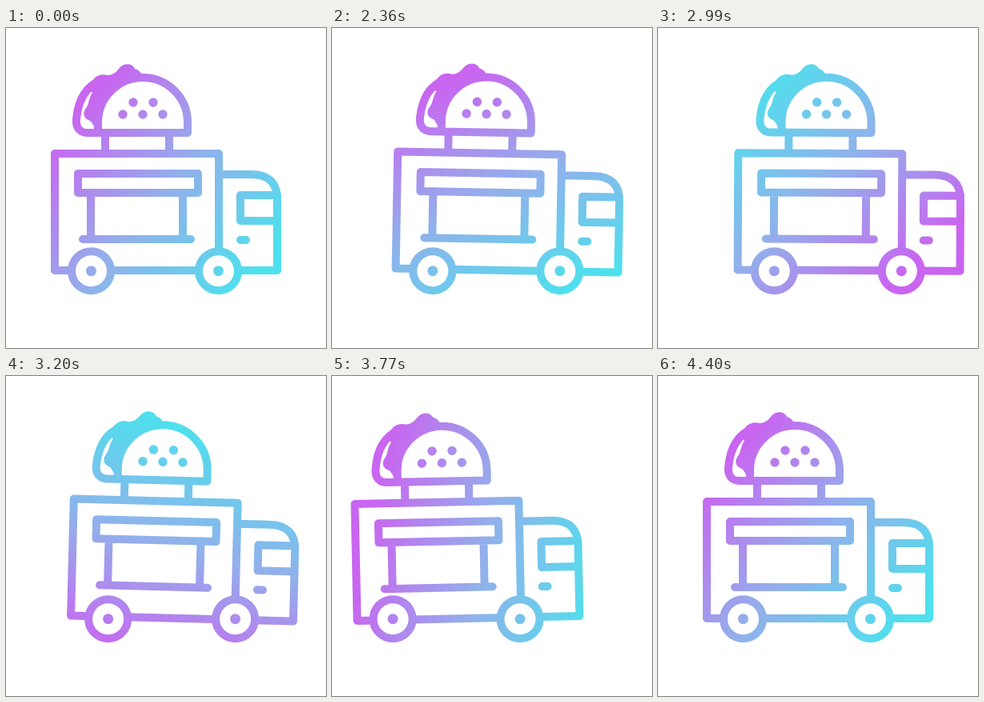
An HTML page for the animation above (4460 ms loop, 400x400 px).

```html
<!DOCTYPE html>
<html lang="en">
<head>
<meta charset="utf-8">
<title>Taco truck</title>
<style>
  html, body { margin: 0; width: 100%; height: 100%; overflow: hidden; background: #fff; }
  svg { display: block; width: 100%; height: 100%; }
</style>
</head>
<body>
<svg viewBox="0 0 400 400">
  <defs>
    <linearGradient id="paint" gradientUnits="userSpaceOnUse" x1="45" y1="210" x2="345" y2="210">
      <stop stop-color="#c965f0"/>
      <stop offset=".5" stop-color="#92b0eb"/>
      <stop offset="1" stop-color="#4ee0ed"/>
    </linearGradient>
  </defs>
  <g id="truck" fill="none" stroke="url(#paint)" stroke-width="10" stroke-linecap="round" stroke-linejoin="round">
    <g id="body">
      <path d="M61 303V157H266V303M61 303H339V214Q339 183 306 183H266"/>
      <path d="M339 209H293V241H339M293 265H300"/>
      <path d="M90 182H240V206H90ZM106 206V264M221 206V264M96 264H231"/>
      <path d="M124 131V157M204 131V157" stroke-linecap="butt"/>
      <path d="M115 131V118A56 56 0 0 1 227 118V131H102C92 131 87 124 88 114C90 92 98 74 118 66"/>
      <path fill="url(#paint)" stroke="none" d="M104 76C107 62 116 56 127 59Q135 59 141 51C147 43 158 44 161 51C168 53 169 57 172 62C143 63 118 84 118 118V128C108 125 109 119 105 116C97 113 95 107 100 100C104 95 103 88 108 81Z"/>
      <g id="beans" fill="url(#paint)" stroke="none"></g>
    </g>
    <g id="wheels"></g>
  </g>
</svg>
<script>
const LOOP = 4460, START = 2000, STEP = 30, DRIVE = 2400;
const $ = id => document.getElementById(id);
const circle = (x, y, r, attrs = '') => `<circle cx="${x}" cy="${y}" r="${r}" ${attrs}/>`;

$('beans').innerHTML = [[159, 93], [184, 93], [146, 108], [171, 108], [196, 108]]
  .map(([x, y]) => circle(x, y, 5.7)).join('');
$('wheels').innerHTML = [106.5, 265.5]
  .map(x => circle(x, 303.7, 24.5, 'fill="#fff"') + circle(x, 303.7, 6.5, 'fill="url(#paint)" stroke="none"'))
  .join('');

const ease = u => (1 - Math.cos(Math.PI * u)) / 2;

// cubic-bezier(c, 0, c, 1), solved by bisection
function bezier(u, c) {
  let low = 0, high = 1, s;
  for (let i = 0; i < 20; i++) {
    s = (low + high) / 2;
    if (3 * c * s * (1 - s) + s ** 3 < u) low = s; else high = s;
  }
  return s * s * (3 - 2 * s);
}

const stops = [[0, 0], [790, 45], [1885, -32.5], [DRIVE, 0]];

function offset(t) {
  const i = Math.max(1, stops.findIndex(([time]) => t <= time));
  const [t0, x0] = stops[i - 1], [t1, x1] = stops[i];
  return x0 + (x1 - x0) * ease((t - t0) / (t1 - t0));
}

function draw(now) {
  const step = Math.floor((now % LOOP - START) / STEP) * STEP;
  const t = Math.min(DRIVE, Math.max(0, step));
  const u = t / DRIVE;
  const x = offset(t);
  const tilt = 1.45 * Math.sin(5 * Math.PI * u);
  const turn = 40 + 360 * bezier(u, 0.37);
  $('truck').setAttribute('transform', `translate(${x})`);
  $('body').setAttribute('transform', `rotate(${tilt} 200 260)`);
  // the gradient stays fixed to the stage while the truck moves
  $('paint').setAttribute('gradientTransform', `translate(${-x}) rotate(${turn} 195 210)`);
}

const begin = performance.now();
(function tick() {
  draw(performance.now() - begin);
  requestAnimationFrame(tick);
})();
</script>
</body>
</html>
```
